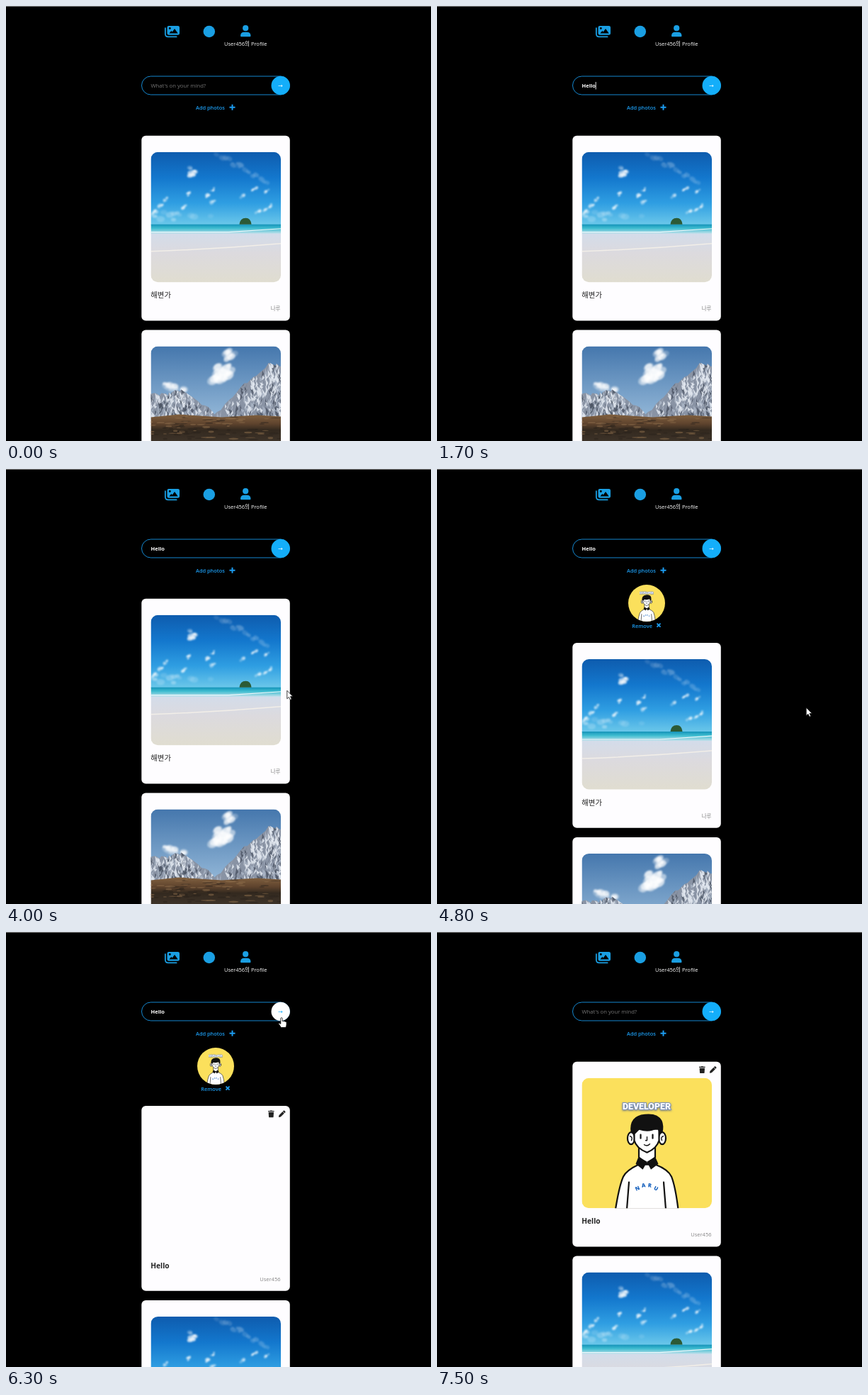
An HTML page that plays this animation: 600x613 px, repeating every 7600 ms.

```html
<!DOCTYPE html>
<html lang="ko">
<head>
<meta charset="utf-8">
<title>Feed</title>
<style>
html, body { margin: 0; width: 100%; height: 100%; overflow: hidden; background: #000; }
svg { display: block; }
text { font-family: "Open Sans", "Noto Sans CJK KR", "Noto Sans CJK", sans-serif; font-size: 7.5px; white-space: pre; }
.link { font-size: 7.4px; font-weight: 600; fill: #1c9cf0; }
.title { font-size: 10.4px; font-weight: 500; fill: #222; }
.bold { font-size: 10.2px; font-weight: 700; }
.by { font-size: 7.5px; fill: #858585; text-anchor: end; }
.ink { fill: none; stroke: #111; stroke-width: 2.2; stroke-linecap: round; stroke-linejoin: round; }
.skin { fill: #fff; }
.shirt { font: 900 14px Roboto, sans-serif; fill: #1560bd; text-anchor: middle; }
.sign { font: 800 12.4px Roboto, sans-serif; fill: #fff; stroke: #7f93b8; stroke-width: 2; paint-order: stroke; text-anchor: middle; }
</style>
</head>
<body>
<svg width="600" height="613" viewBox="0 0 600 613">
  <defs>
    <clipPath id="frame"><rect width="183.5" height="183.5" rx="10"/></clipPath>
    <clipPath id="loaded"><rect id="loadBox" width="184" height="0"/></clipPath>
    <clipPath id="round"><circle cx="91.75" cy="91.75" r="91.75"/></clipPath>
    <filter id="soft" x="-20%" y="-20%" width="140%" height="140%"><feGaussianBlur stdDeviation=".9"/></filter>
    <filter id="glow" x="-20%" y="-80%" width="140%" height="260%"><feDropShadow dx="0" dy="1" stdDeviation="1.8" flood-color="#5b6a86" flood-opacity=".8"/></filter>
    <linearGradient id="sky" x2="0" y2="1">
      <stop stop-color="#0e5cae"/><stop offset=".35" stop-color="#1377cd"/>
      <stop offset=".7" stop-color="#2f9ee2"/><stop offset="1" stop-color="#6cc8ea"/>
    </linearGradient>
    <linearGradient id="sea" x2="0" y2="1">
      <stop stop-color="#1593b9"/><stop offset=".4" stop-color="#3fbdd0"/><stop offset="1" stop-color="#cfe4ee"/>
    </linearGradient>
    <linearGradient id="sand" x2="0" y2="1">
      <stop stop-color="#d3dcea"/><stop offset=".4" stop-color="#dcdade"/><stop offset="1" stop-color="#e0ddd0"/>
    </linearGradient>
    <linearGradient id="alpSky" x2="0" y2="1"><stop stop-color="#4577ad"/><stop offset="1" stop-color="#94b8d8"/></linearGradient>
    <linearGradient id="ground" x2="0" y2="1">
      <stop stop-color="#80603f"/><stop offset=".15" stop-color="#5e432d"/>
      <stop offset=".25" stop-color="#33291f"/><stop offset="1" stop-color="#5f5348"/>
    </linearGradient>

    <g id="beach" clip-path="url(#frame)">
      <rect width="184" height="103" fill="url(#sky)"/>
      <g id="beachClouds" fill="#fff" filter="url(#soft)"></g>
      <rect y="102" width="184" height="14" fill="url(#sea)"/>
      <rect y="115" width="184" height="69" fill="url(#sand)"/>
      <path d="M0 113H110L184 108" fill="none" stroke="#eef8fb" stroke-width="1.2"/>
      <path d="M0 140Q90 137 184 129" fill="none" stroke="#f2eee8" stroke-width="1.5"/>
      <path d="M125 102q1-9 9-9 7 0 8 9z" fill="#2c5a35"/>
    </g>

    <g id="alps" clip-path="url(#frame)">
      <rect width="184" height="102" fill="url(#alpSky)"/>
      <g id="alpClouds" fill="#fff" filter="url(#soft)"></g>
      <g id="ranges"></g>
      <path d="M0 100l40-4 60 4 50-3 34 2v85H0z" fill="url(#ground)"/>
      <g id="scrub"></g>
    </g>

    <g id="avatar">
      <rect width="183.5" height="183.5" fill="#fbe05c"/>
      <path class="ink skin" d="M47.500 185Q53 151 58.500 139Q63 130 80 122H104Q122 129 126.500 139Q132 153 136 185Z"/>
      <path class="ink" d="M63.500 185L66.500 147M118.500 185L115.500 147"/>
      <path class="ink skin" d="M80.500 96V112L92 121L103.500 112V96Z"/>
      <path d="M80 111L92 118L103.500 111L108 121L97.500 129L92 118.500L86 129L76 121Z" fill="#111"/>
      <g class="ink skin">
        <ellipse cx="69.500" cy="85" rx="5" ry="8.500"/>
        <ellipse cx="113.500" cy="85" rx="5" ry="8.500"/>
        <path d="M74 72V88Q77 99 92 105Q106 99 109 88V72Z"/>
      </g>
      <path d="M69 77Q66 53 89 51Q107 49 113 60Q116 67 114 77L109 79Q109 74 106 71Q95 78 81 73L75 79Z" fill="#111"/>
      <path class="ink" d="M83 80v5M100 80v5"/>
      <path class="ink" d="M92 83v5h-2M88 94q4 3 8-1M68 82q4 1 2 6M115 82q-4 1-2 6" style="stroke-width:1.4"/>
      <text class="sign" x="91.500" y="44.800" filter="url(#glow)">DEVELOPER</text>
      <g id="shirt" class="shirt"></g>
    </g>
    <path id="trash" d="M432 32H312l-9-19Q296 0 281 0H167Q152 0 145 13L136 32H16Q0 32 0 48V80Q0 96 16 96H432Q448 96 448 80V48Q448 32 432 32zM53 467Q58 512 101 512H347Q390 512 395 467L416 128H32z"/>
    <path id="pencil" d="M498 142L452 188Q443 197 435 188L324 77Q315 69 324 60L370 14Q404-14 438 14L498 74Q526 108 498 142zM284 100L22 362 0 484Q0 515 28 512L150 490 412 228Q421 219 412 211L301 100Q293 92 284 100z"/>
  </defs>

  <rect width="600" height="613"/>
  <rect width="600" height="1" fill="#777"/>

  <g fill="#1a9fe3">
    <g transform="translate(224 26.800) scale(.0365)">
      <path d="M24 120V344Q24 456 136 456H456" fill="none" stroke="#1a9fe3" stroke-width="48" stroke-linecap="round"/>
      <path fill-rule="evenodd" d="M160 32H512Q576 32 576 96V320Q576 384 512 384H160Q96 384 96 320V96Q96 32 160 32zM240 128a40 40 0 1 1-80 0a40 40 0 1 1 80 0zM176 320L256 224L296 264L384 144L512 320z"/>
    </g>
    <circle cx="286.800" cy="36" r="8.300"/>
    <circle cx="338.200" cy="31.200" r="4.100"/>
    <path d="M331 42Q331 36.800 336.700 36.800H339.700Q345.500 36.800 345.500 42Q345.500 43.300 344.300 43.300H332.200Q331 43.300 331 42z"/>
  </g>
  <text x="338.200" y="56" fill="#fff" text-anchor="middle">User456의 Profile</text>

  <rect x="191.500" y="99" width="209" height="26" rx="13" stroke="#1487cf"/>
  <text id="hint" x="204.500" y="115" style="font-size:7.7px" fill="#757575">What's on your mind?</text>
  <text id="typed" x="204.500" y="115" fill="#fff" font-weight="700"></text>
  <rect id="caret" y="107" width=".9" height="10.500" fill="#fff"/>
  <circle id="send" cx="387.700" cy="112" r="13.200"/>
  <text id="arrow" x="387.700" y="114.700" text-anchor="middle" style="font:8px 'DejaVu Sans',sans-serif">→</text>

  <text class="link" x="268" y="145.800">Add photos</text>
  <path d="M315.500 142.800h8M319.500 138.800v8" stroke="#1c9cf0" stroke-width="2"/>

  <g id="preview">
    <g transform="translate(270 163) scale(.2834)"><g clip-path="url(#round)"><use href="#avatar"/></g></g>
    <text class="link" x="275.300" y="223.700">Remove</text>
    <path d="M310.500 217.600l5 5m0-5l-5 5" stroke="#1c9cf0" stroke-width="1.800"/>
  </g>

  <g id="cards"></g>

  <path id="pointer" d="M0 0V11.500L2.700 9.200L4.500 13L6.500 12.200L4.700 8.400H8.200Z" fill="#fff" stroke="#111" stroke-width=".8"/>
  <path id="hand" d="M-1.200 1Q0-.8 1.200 1V5.200Q2.500 4.200 3.400 5.400Q4.700 4.700 5.300 6Q6.800 5.500 7 7V10Q7 12 5.800 14H-.8Q-2 11.500-4.200 8.800Q-3.800 7-1.200 9Z" fill="#fff" stroke="#111" stroke-width=".8"/>
</svg>
<script>
const LOOP = 7600, STEP = 100;
const FOCUS = 100, TYPE = 400, KEY_GAP = 250, BLUR = 2000;
const ENTER = 3900, PICK = 4200, DIALOG = 4400, ATTACH = 4700;
const ARRIVE = 5400, HOVER = 5500, POST = 6000, RESET = 6500, LOAD = 6600, LEAVE = 7100, GONE = 7400;
const WORD = 'Hello', ADD = [319, 142], SEND = [389, 120.5];

const $ = id => document.getElementById(id);
const clamp = v => Math.max(0, Math.min(1, v));
const mix = (a, b, u) => a + (b - a) * u;
const easeOut = u => 1 - (1 - u) ** 2;

function random(seed) {
  return () => (seed = seed * 16807 % 2147483647) / 2147483647;
}

// A clump of n puffs inside a w by h ellipse tilted by angle.
function cloud(rnd, x, y, w, h, n, size, angle = 0) {
  let out = '';
  for (let i = 0; i < n; i++) {
    const a = rnd() * 2 * Math.PI, r = Math.sqrt(rnd()), s = size * (0.5 + rnd());
    out += `<ellipse cx="${r * w * Math.cos(a)}" cy="${r * h * Math.sin(a)}" rx="${s * 1.4}" ry="${s}" opacity="${0.2 + rnd() * 0.5}"/>`;
  }
  return `<g transform="translate(${x} ${y}) rotate(${angle})">${out}</g>`;
}

// A rocky slope: a jagged ridge along the key points, with snow and shadow streaks below it.
function range(rnd, points) {
  const ridge = [];
  points.slice(1).forEach((b, i) => {
    const a = points[i];
    for (let u = 0; u < 1; u += 0.125) ridge.push([mix(a[0], b[0], u), mix(a[1], b[1], u) + (rnd() - 0.5) * 5]);
  });
  const last = points[points.length - 1];
  ridge.push(last);
  let out = `<path d="M${ridge.join('L')}L${last[0]} 104H${points[0][0]}Z" fill="#8993a4"/>`;
  ridge.forEach(([x, y]) => {
    for (let yy = y; yy < 97; yy += 4 + rnd() * 4) {
      const lean = (rnd() - 0.6) * 9, len = 5 + rnd() * 9;
      const fill = rnd() < 0.55 * (1.5 - yy / 110) ? '#e3e9f1' : rnd() < 0.5 ? '#4d5666' : '#a9b4c4';
      out += `<path d="M${x} ${yy}l${lean} ${len}l${2 + rnd() * 3} ${-len / 2}Z" fill="${fill}" opacity=".85"/>`;
    }
  });
  return out;
}

function scrub(rnd) {
  let out = '';
  for (let i = 0; i < 90; i++) {
    const y = 99 + rnd() * 34;
    out += `<ellipse cx="${rnd() * 184}" cy="${y}" rx="${2 + rnd() * 6}" ry="${0.5 + rnd()}" fill="${rnd() < 0.5 ? '#2a221b' : '#92714e'}" opacity=".5"/>`;
  }
  return out;
}

const rnd = random(77);
let sky = cloud(rnd, 57, 27, 6, 7, 14, 2.6) + cloud(rnd, 130, 24, 48, 4, 24, 2.5, 30).replace('<g', '<g opacity=".3"');
for (let i = 0; i < 14; i++) sky += cloud(rnd, rnd() * 184, 48 + rnd() * 40, 4, 2, 5, 1.5, -30);
$('beachClouds').innerHTML = sky + cloud(rnd, 40, 90, 45, 6, 16, 3).replace('<g', '<g opacity=".5"');
$('alpClouds').innerHTML = cloud(rnd, 100, 38, 18, 11, 34, 4, -35) + cloud(rnd, 110, 12, 10, 5, 14, 3, -30) + cloud(rnd, 34, 58, 18, 5, 20, 3, 12);
$('ranges').innerHTML = range(rnd, [[0, 68], [24, 67], [38, 61], [58, 70], [95, 98]]) + range(rnd, [[88, 99], [132, 54], [166, 25], [184, 28]]);
$('scrub').innerHTML = scrub(rnd);

$('shirt').innerHTML = [...'NARU'].map((c, i) => {
  const d = i - 1.5;
  return `<text transform="translate(${91.5 + d * 9.4} ${148.5 + d * d * 2.2}) rotate(${d * 17})" y="5">${c}</text>`;
}).join('');

function card(id, picture, title, by, style = '', extra = '') {
  return `<g id="${id}"><rect x="191.300" width="209.500" height="260.700" rx="6" fill="#fefdff"/>
    <g transform="translate(204.500 23)">${picture}</g>
    <text class="title ${style}" x="204.300" y="228.700">${title}</text>
    <text class="by" x="387.500" y="246.800">${by}</text>${extra}</g>`;
}
const tools = `<use href="#trash" fill="#222" transform="translate(370 6.500) scale(.0192)"/>
  <use href="#pencil" fill="#222" transform="translate(385 6.500) scale(.0186)"/>`;
$('cards').innerHTML =
  card('mine', '<g clip-path="url(#loaded)"><g clip-path="url(#frame)"><use href="#avatar"/></g></g>', WORD, 'User456', 'bold', tools) +
  card('shore', '<use href="#beach"/>', '해변가', '나루') +
  card('peaks', '<use href="#alps"/>', '설산', '나루');

const show = (id, on) => $(id).setAttribute('display', on ? 'inline' : 'none');
const move = (id, x, y) => $(id).setAttribute('transform', `translate(${x} ${y})`);

function glide(t, start, end, from, to) {
  const u = easeOut(clamp((t - start) / (end - start)));
  return [mix(from[0], to[0], u), mix(from[1], to[1], u)];
}

function cursorAt(t) {
  if (t < ENTER || t === DIALOG || t > GONE) return null;
  if (t < DIALOG) return glide(t, ENTER, PICK, [494, 525], ADD);
  if (t <= LEAVE) return glide(t, ATTACH, ARRIVE, [569, 414], SEND);
  return glide(t, LEAVE, GONE, SEND, [275, 590]);
}

function draw(t) {
  const typed = t < RESET ? WORD.slice(0, Math.max(0, Math.floor((t - TYPE) / KEY_GAP) + 1)) : '';
  $('typed').textContent = typed;
  show('hint', !typed);
  show('caret', t >= FOCUS && t < BLUR);
  $('caret').setAttribute('x', 204.3 + (typed ? $('typed').getComputedTextLength() : 0));

  const hover = t >= HOVER && t <= LEAVE;
  $('send').setAttribute('fill', hover ? '#fff' : '#14aefa');
  $('arrow').setAttribute('fill', hover ? '#14aefa' : '#fff');

  const preview = t >= ATTACH && t < RESET, posted = t >= POST;
  show('preview', preview);
  show('mine', posted);
  $('loadBox').setAttribute('height', 183.5 * clamp((t - LOAD) / 400));
  const top = preview ? 245 : 182.7;
  ['mine', 'shore', 'peaks'].forEach((id, i) => move(id, 0, top + (posted ? i : i - 1) * 273.9));

  const p = cursorAt(t);
  const link = t >= PICK && t < DIALOG || t >= ARRIVE && t <= LEAVE;
  show('pointer', p && !link);
  show('hand', p && link);
  if (p) move(link ? 'hand' : 'pointer', ...p);
}

function tick() {
  draw(Math.floor(performance.now() % LOOP / STEP) * STEP);
  requestAnimationFrame(tick);
}
tick();
</script>
</body>
</html>
```
